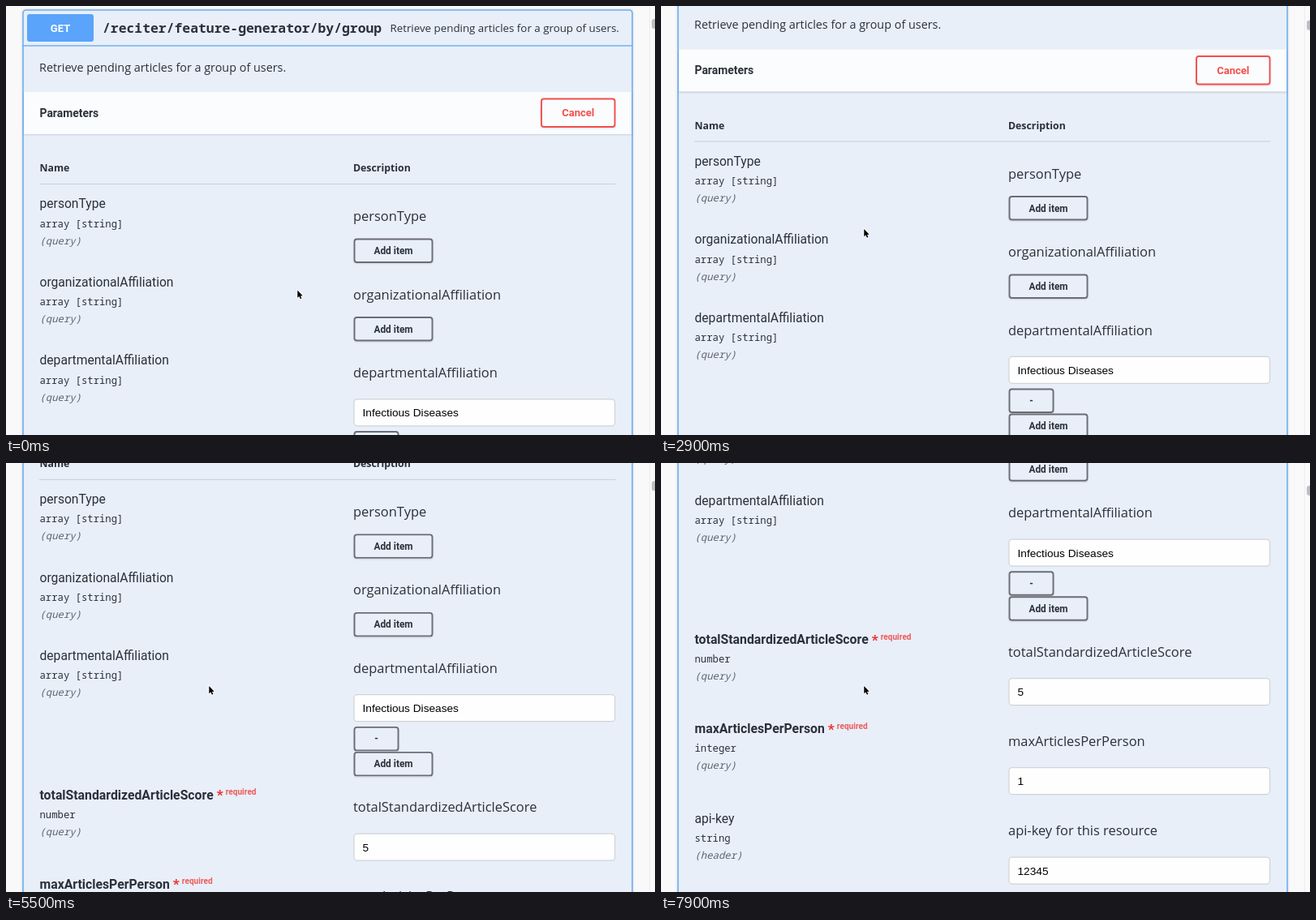
These frames come from a looping animation (800 by 529 pixels, 8000 ms). An HTML page with a canvas:

```html
<!DOCTYPE html>
<html lang="en">
<head>
<meta charset="utf-8">
<title>API parameters</title>
<style>
html, body { margin: 0; width: 100%; height: 100%; overflow: hidden; background: #faf9fa; }
canvas { display: block; width: 800px; height: 529px; }
</style>
</head>
<body>
<canvas id="stage"></canvas>
<script>
const W = 800, H = 529, LOOP = 8000, STEP = 100;
const INK = '#2b303a', BLUE = '#6aaef3', RED = '#f44e4a', GRAY = '#6c6c76';
const PANEL = '#e8eff8', HEADER = '#fafcfe';
const SANS = '"Open Sans", sans-serif';
const NARROW = 'Roboto, sans-serif';
const MONO = '"Noto Sans Mono", "DejaVu Sans Mono", monospace';
const ARIAL = '"Liberation Sans", Arial, sans-serif';

const canvas = document.getElementById('stage');
const ctx = canvas.getContext('2d');
const ratio = window.devicePixelRatio || 1;
canvas.width = W * ratio;
canvas.height = H * ratio;

// [time, offset] pairs; equal neighbours are rests between flicks
const scrollKeys = [
  [1800, 0], [2400, 17.5], [3000, 60], [3600, 103], [4000, 110], [4100, 110],
  [4600, 165.5], [5100, 182], [5200, 182], [6000, 259], [6900, 359],
  [7400, 383], [7900, 390.7]
];

const rows = [
  { y: 244, name: 'personType', type: 'array [string]' },
  { y: 340.5, name: 'organizationalAffiliation', type: 'array [string]' },
  { y: 437, name: 'departmentalAffiliation', type: 'array [string]', value: 'Infectious Diseases', list: true },
  { y: 608.5, name: 'totalStandardizedArticleScore', type: 'number', value: '5', required: true },
  { y: 718.5, name: 'maxArticlesPerPerson', type: 'integer', value: '1', required: true },
  { y: 829, name: 'api-key', type: 'string', value: '12345', title: 'api-key for this resource', place: '(header)' }
];

// Monotone cubic interpolation through the keys
function glide(keys, t) {
  const last = keys.length - 1;
  if (t <= keys[0][0]) return keys[0][1];
  if (t >= keys[last][0]) return keys[last][1];
  const slope = i => (keys[i + 1][1] - keys[i][1]) / (keys[i + 1][0] - keys[i][0]);
  const tangent = i => {
    if (i === 0 || i === last) return 0;
    const a = slope(i - 1), b = slope(i);
    return a * b <= 0 ? 0 : 2 * a * b / (a + b);
  };
  let i = 0;
  while (t > keys[i + 1][0]) i++;
  const d = keys[i + 1][0] - keys[i][0];
  const u = (t - keys[i][0]) / d, v = 1 - u;
  return keys[i][1] * (1 + 2 * u) * v * v + tangent(i) * d * u * v * v
    + keys[i + 1][1] * u * u * (3 - 2 * u) - tangent(i + 1) * d * u * u * v;
}

function text(str, x, y, font, color = INK, align = 'left') {
  ctx.font = font;
  ctx.fillStyle = color;
  ctx.textAlign = align;
  ctx.fillText(str, x, y);
}

function rect(x, y, w, h, color) {
  ctx.fillStyle = color;
  ctx.fillRect(x, y, w, h);
}

function box(x, y, w, h, r, fill, stroke, line) {
  ctx.beginPath();
  ctx.roundRect(x, y, w, h, r);
  if (fill) { ctx.fillStyle = fill; ctx.fill(); }
  if (stroke) { ctx.strokeStyle = stroke; ctx.lineWidth = line; ctx.stroke(); }
}

// Filled box whose shadow falls only outside
function raised(x, y, w, h, r, fill, alpha, blur, dy) {
  ctx.save();
  ctx.shadowColor = `rgba(0,0,0,${alpha})`;
  ctx.shadowBlur = blur * ratio;
  ctx.shadowOffsetY = dy * ratio;
  box(x, y, w, h, r, fill);
  ctx.restore();
}

function button(label, x, y, w, h, size, color = GRAY, ink = INK, fill = PANEL) {
  raised(x, y, w, h, 4, fill, .12, 2, 1);
  box(x + 1, y + 1, w - 2, h - 2, 3, null, color, 1.9);
  text(label, x + w / 2, y + h / 2 + size * .36, `700 ${size}px ${NARROW}`, ink, 'center');
}

function drawRow({ y, name, type, value, list, required, title = name, place = '(query)' }) {
  const font = required ? `700 15.8px ${NARROW}` : `400 15.65px ${NARROW}`;
  text(name, 41.5, y + 5.3, font);
  if (required) {
    const end = 41.5 + ctx.measureText(name).width;
    text('*', end + 4, y + 6, `900 17px ${NARROW}`, '#f0302e');
    text('required', end + 15, y, `700 10.1px ${NARROW}`, '#ee5c5c');
  }
  text(type, 41.5, y + 28.5, `500 12.25px ${MONO}`);
  text(place, 41.5, y + 49.5, `italic 400 12.25px ${MONO}`, '#5f646d');
  text(title, 428, y + 21, `400 16.45px ${SANS}`);

  if (value) {
    box(429, y + 47.8, 321.5, 33, 4, '#fefefe', '#d0d3d7', 1.2);
    text(value, 439.5, y + 69.3, `400 13.67px ${ARIAL}`, '#000');
  } else {
    button('Add item', 428.5, y + 42.5, 98, 30.5, 11.85);
  }
  if (list) {
    button('-', 428.5, y + 87, 56, 30.5, 11.85);
    button('Add item', 428.5, y + 118, 98, 30.5, 11.85);
  }
}

function drawPanel() {
  raised(20.3, 4.2, 752.4, 1101, 4, PANEL, .19, 3, 0);
  box(21, 5, 751, 1100, 4, null, BLUE, 1.6);

  box(26, 10, 82, 34, 3, '#5aa4fb');
  text('GET', 67, 31.8, `700 13px ${NARROW}`, '#fff', 'center');
  text('/reciter/feature-generator/by/group', 119, 33, `600 16.4px ${MONO}`);
  text('Retrieve pending articles for a group of users.', 473.5, 32, `400 13.33px ${SANS}`);
  rect(21, 48.3, 751, 1.4, BLUE);
  text('Retrieve pending articles for a group of users.', 41, 80.5, `400 14.37px ${SANS}`);

  raised(22, 106, 749, 52, 0, HEADER, .14, 2, 1);
  text('Parameters', 41.5, 136.7, `700 13.9px ${NARROW}`);
  button('Cancel', 659, 113.5, 92.5, 36.5, 13, RED, RED, HEADER);

  text('Name', 41.5, 204, `700 12.3px ${SANS}`);
  text('Description', 428, 204, `700 12.3px ${SANS}`);
  rect(41, 219, 710.5, 1, '#c8d0da');
  rows.forEach(drawRow);
}

function drawScrollbar(scroll) {
  rect(793, 0, 7, H, '#fbfafb');
  rect(793, 0, 1, H, '#ececee');
  box(796, 16 + scroll * .031, 8, 12, 3, '#bfbfc1');
}

function drawCursor(t) {
  const p = Math.min(1, Math.max(0, (t - 400) / 1200));
  const e = p * p * (3 - 2 * p);
  ctx.save();
  ctx.translate(359.3 - 109 * e, 350.5 - 75.5 * e);
  ctx.beginPath();
  [[0, 0], [0, 9.3], [2.1, 7.4], [3.6, 10.8], [5.1, 10.1], [3.7, 6.9], [6.4, 6.7]]
    .forEach(([x, y]) => ctx.lineTo(x, y));
  ctx.closePath();
  ctx.strokeStyle = '#fff';
  ctx.lineWidth = 1.6;
  ctx.stroke();
  ctx.fillStyle = '#000';
  ctx.fill();
  ctx.restore();
}

function draw(t) {
  const scroll = glide(scrollKeys, t);
  ctx.setTransform(ratio, 0, 0, ratio, 0, 0);
  rect(0, 0, W, H, '#faf9fa');
  ctx.save();
  ctx.translate(0, -scroll);
  drawPanel();
  ctx.restore();
  drawScrollbar(scroll);
  drawCursor(t);
}

const start = performance.now();
function tick() {
  const t = (performance.now() - start) % LOOP;
  draw(Math.floor(t / STEP) * STEP);
  requestAnimationFrame(tick);
}
tick();
</script>
</body>
</html>
```
